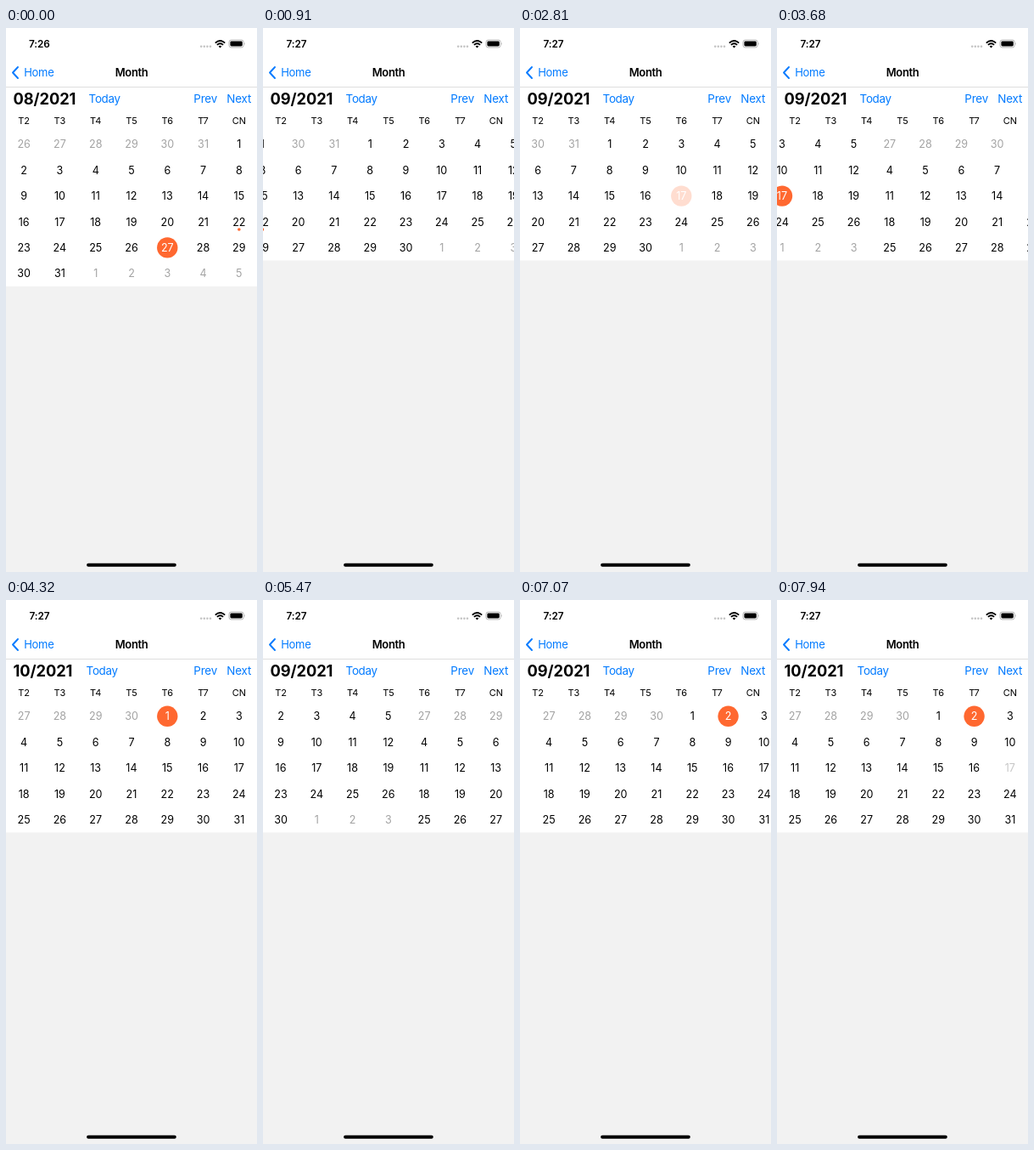
Animation of 296x640 px, one loop 8000 ms. Source, as an HTML page:

```html
<!DOCTYPE html>
<html lang="en">
<head>
<meta charset="utf-8">
<title>Month</title>
<style>
  html, body { margin: 0; width: 100%; height: 100%; overflow: hidden; background: #fff; }
  svg { display: block; width: 100vw; height: 100vh; }
  text { font-family: Inter, Roboto, sans-serif; fill: #000; }
  .mid { text-anchor: middle; }
  .link { font-size: 13.4px; fill: #007aff; letter-spacing: -.3px; }
  .link.back { font-size: 13px; }
  .link.tight { letter-spacing: -.1px; }
  .nav { font-size: 13px; font-weight: 600; letter-spacing: -.4px; }
  .clock { font-size: 11.8px; font-weight: 600; letter-spacing: -.1px; }
  .heading { font-size: 18.3px; font-weight: 700; letter-spacing: -.1px; }
  .weekday { font-size: 11px; }
  .day { font-size: 12.6px; }
  .day.outside { fill: #a3a3a3; }
  .disc, .dot { fill: #ff6830; }
  .disc { visibility: hidden; }
  .selected .disc { visibility: visible; }
  .selected .day { fill: #fff; }
</style>
</head>
<body>
<svg viewBox="0 0 296 640">
  <rect width="296" height="640" fill="#fff"/>
  <g id="pages"></g>
  <rect id="backdrop" width="296" height="370" fill="#f2f2f2"/>

  <text id="clock" class="clock mid" x="39.4" y="22.9">7:26</text>
  <g fill="#c4c4c4">
    <rect x="229" y="20.5" width="2.4" height="2.4" rx=".8"/>
    <rect x="232.6" y="20.5" width="2.4" height="2.4" rx=".8"/>
    <rect x="236.2" y="20.5" width="2.4" height="2.4" rx=".8"/>
    <rect x="239.8" y="20.5" width="2.4" height="2.4" rx=".8"/>
  </g>
  <g fill="none" stroke="#000" stroke-width="1.9">
    <path d="M246.8 17.6Q252.5 12.4 258.2 17.6"/>
    <path d="M248.9 19.9Q252.5 16.6 256.1 19.9"/>
  </g>
  <path d="M250.6 21.5Q252.5 20 254.4 21.5L252.5 23.4Z"/>
  <rect x="263" y="14.1" width="17.2" height="8.8" rx="2.6" fill="none" stroke="#a2a2a2" stroke-width=".8"/>
  <rect x="264.4" y="15.5" width="14.4" height="6" rx="1.4"/>
  <path d="M281.1 17q1.3 1.5 0 3z" fill="#a2a2a2"/>

  <path d="M14 46L8 52.5L14 59" fill="none" stroke="#007aff" stroke-width="1.9" stroke-linecap="round" stroke-linejoin="round"/>
  <text class="link back" x="21.2" y="57">Home</text>
  <text class="nav mid" x="148" y="57">Month</text>
  <rect y="69" width="296" height="1" fill="#dedede"/>

  <text id="heading" class="heading" x="8.5" y="90.2"></text>
  <text id="today" class="link" y="88.4">Today</text>
  <text class="link tight" x="221.2" y="88.4">Prev</text>
  <text class="link tight" x="260.2" y="88.4">Next</text>
  <g id="weekdays"></g>
  <rect x="95.1" y="629.8" width="105.7" height="4" rx="2"/>
</svg>
<script>
const LOOP = 8000, WIDTH = 296, COL = WIDTH / 7, ROW = 30.4, FIRST_MONTH = 8;
const $ = id => document.getElementById(id);
const pageX = month => (month - FIRST_MONTH) * WIDTH;
const colX = col => (col + .5) * COL;

function add(parent, tag, attrs, text = '') {
  const el = document.createElementNS('http://www.w3.org/2000/svg', tag);
  for (const key in attrs) el.setAttribute(key, attrs[key]);
  el.textContent = text;
  return parent.appendChild(el);
}

// Cells are keyed "month.day"; days outside the month run below 1 or past its end.
const cells = {};

function buildPage(month, rows) {
  const page = add($('pages'), 'g', { transform: `translate(${pageX(month)})` });
  const lead = (new Date(2021, month - 1, 1).getDay() + 6) % 7;
  for (let i = 0; i < rows * 7; i++) {
    const day = i - lead + 1, date = new Date(2021, month - 1, day);
    const outside = date.getMonth() !== month - 1;
    const x = colX(i % 7), y = 136.8 + Math.floor(i / 7) * ROW;
    const cell = cells[`${month}.${day}`] = add(page, 'g', {});
    add(cell, 'circle', { class: 'disc', cx: x, cy: y, r: 12.2 });
    add(cell, 'text', { class: `day mid ${outside ? 'outside' : ''}`, x, y: y + 4.6 }, date.getDate());
    if (month === 8 && day === 22) add(cell, 'circle', { class: 'dot', cx: x, cy: y + 9, r: 1.8 });
  }
}

buildPage(8, 6);
buildPage(9, 5);
buildPage(10, 5);
['T2', 'T3', 'T4', 'T5', 'T6', 'T7', 'CN'].forEach((name, col) =>
  add($('weekdays'), 'text', { class: 'weekday mid', x: colX(col), y: 113.3 }, name));

const SEP = pageX(9), OCT = pageX(10);
const initial = { scroll: 0, month: 8, clock: '7:26', bottom: 304, selected: '8.27', pressed: '', alpha: 1 };

// A tap dims the cell, selects it, then restores it.
const tap = (cell, times) => [
  [times[0], { pressed: cell, alpha: .22 }],
  [times[1], { selected: cell }],
  [times[2], { alpha: .7 }],
  [times[3], { pressed: '' }]
];

const steps = [
  [500, { scroll: 11, clock: '7:27' }],
  [600, { scroll: 66 }],
  [710, { scroll: 165 }],
  [810, { scroll: SEP - 53, month: 9, bottom: 273.5 }],
  [910, { scroll: SEP - 20.5 }],
  [1010, { scroll: SEP - 8 }],
  [1120, { scroll: SEP - 3, selected: '9.1' }],
  [1240, { scroll: SEP - 1 }],
  [1360, { scroll: SEP }],

  ...tap('9.16', [2060, 2170, 2290, 2400]),
  ...tap('9.17', [2680, 2810, 2920, 3020]),

  [3360, { scroll: SEP + 9 }],
  [3470, { scroll: SEP + 44 }],
  [3580, { scroll: SEP + 104 }],
  [3680, { scroll: OCT - 111.7 }],
  [3780, { scroll: OCT - 43, month: 10 }],
  [3890, { scroll: OCT - 17 }],
  [4000, { scroll: OCT - 6 }],
  [4110, { scroll: OCT - 2.5 }],
  [4210, { scroll: OCT - 1, selected: '10.1' }],
  [4320, { scroll: OCT }],

  [5170, { pressed: '10.-1', alpha: .22 }],
  [5360, { scroll: OCT - 12, pressed: '' }],
  [5470, { scroll: SEP + 127, month: 9, selected: '9.29' }],
  [5590, { scroll: SEP - 6 }],

  [6670, { scroll: SEP, pressed: '9.32', alpha: .22 }],
  [6860, { scroll: SEP + 13, pressed: '' }],
  [6970, { scroll: OCT - 127, selected: '10.2' }],
  [7070, { scroll: OCT - 13 }],
  [7940, { scroll: OCT, month: 10, pressed: '10.17', alpha: .22 }]
];

function draw(time) {
  const state = Object.assign({}, initial, ...steps.filter(([at]) => at <= time).map(([, change]) => change));
  $('pages').setAttribute('transform', `translate(${-state.scroll})`);
  $('backdrop').setAttribute('y', state.bottom);
  $('clock').textContent = state.clock;
  $('heading').textContent = `${String(state.month).padStart(2, '0')}/2021`;
  $('today').setAttribute('x', state.month === 10 ? 94.6 : 97.6);
  for (const key in cells) {
    cells[key].classList.toggle('selected', key === state.selected);
    cells[key].setAttribute('opacity', key === state.pressed ? state.alpha : 1);
  }
}

const start = performance.now();
function tick() {
  draw((performance.now() - start) % LOOP);
  requestAnimationFrame(tick);
}
tick();
</script>
</body>
</html>
```
